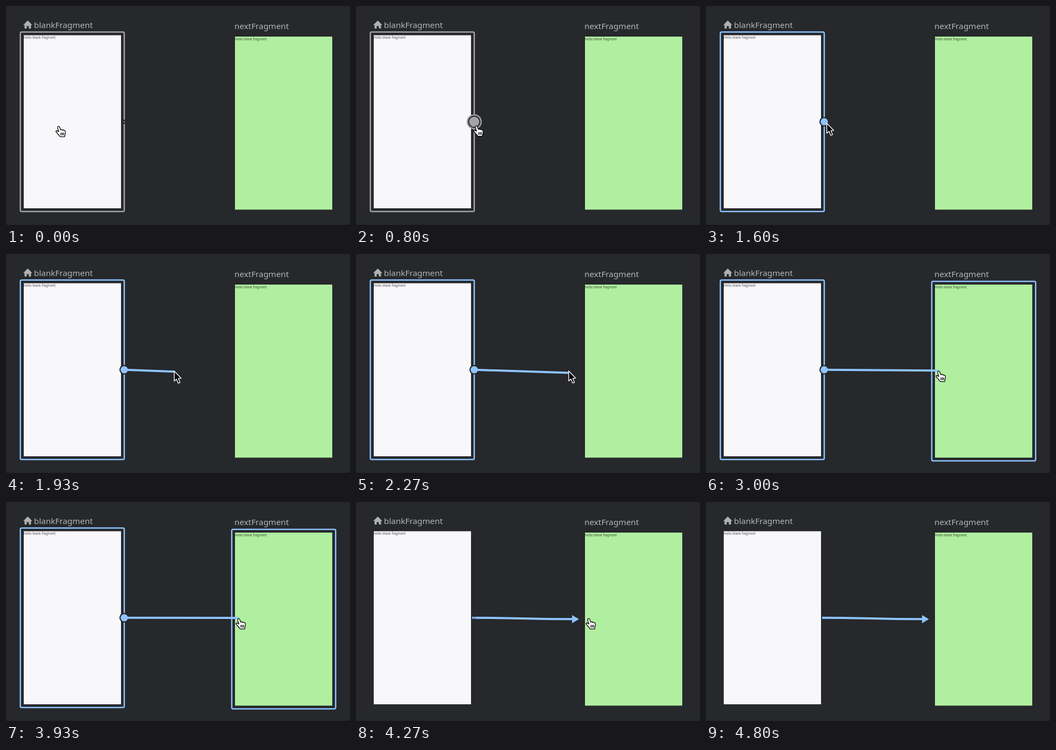
An HTML page for the animation above (5270 ms loop, 640 by 410 pixels).

```html
<!DOCTYPE html>
<html lang="en">
<head>
<meta charset="utf-8">
<title>Connecting fragments</title>
<style>
  html, body { margin: 0; width: 100%; height: 100%; overflow: hidden; background: #26282b; }
  svg { display: block; width: 100vw; height: 100vh; }
  .title { font: 15.3px "Noto Sans", sans-serif; fill: #b5b5b5; }
  .hello { font: 6.4px Roboto, sans-serif; fill: #000; fill-opacity: .62; }
  .frame { fill: none; stroke-width: 2.5; }
  .line { fill: none; stroke: #8fc3ff; stroke-width: 4; }
</style>
</head>
<body>
<svg viewBox="0 0 640 410">
  <rect width="640" height="410" fill="#26282b"/>
  <rect y="408" width="640" height="2" fill="#161517"/>

  <path fill="#b0b0b0" d="M32 35.5 40.5 27 49 35.5H46.5V42H42.5V37.5H38.5V42H34.5V35.5Z"/>
  <text class="title" x="52" y="40.7">blankFragment</text>
  <rect x="33" y="54.5" width="181" height="322.5" fill="#f8f7fa"/>
  <text class="hello" x="33" y="61.3">Hello blank fragment</text>
  <rect id="from" class="frame" x="26.7" y="48.5" width="193.3" height="334.5" rx="2.5"/>

  <text class="title" x="425" y="43.3">nextFragment</text>
  <rect x="426" y="57" width="181" height="322.5" fill="#b0eea0"/>
  <text class="hello" x="426" y="63.8">Hello blank fragment</text>
  <rect id="to" class="frame" x="420" y="51" width="193.3" height="334.5" rx="2.5" stroke="#8fc3ff"/>

  <g id="action">
    <path class="line" d="M216 215.7C309 215.7 309 218.3 403 218.3"/>
    <path fill="#8fc3ff" d="M402 210.7 414.7 218.3 402 226Z"/>
  </g>

  <circle id="rim" cx="220" cy="215.7" fill="#26282b" stroke="#a3a3a5"/>
  <path id="drag" class="line"/>
  <circle id="dot" cx="220" cy="215.7"/>

  <g id="hand" stroke="#000" stroke-width="1.3" stroke-linejoin="round">
    <path fill="#fff" d="M4.2 2.2C5 .5 7 .8 7.6 2.4L9.8 8C10.5 7 12 7 12.6 8.2 13.5 7.4 15 7.8 15.4 9 16.6 8.4 18 9 18.3 10.6 18.8 13.5 18.6 15 17.6 17.2L17 20.6H8.6C7.6 18.4 5 16.5 3.6 14.4 2.6 13 .8 12 .8 10.6 1 9.2 3 9.2 4.6 10.2L6.2 11.4 4.2 5Z"/>
    <path fill="none" d="M10.2 13v5M12.7 13v5M15.2 13v5"/>
  </g>
  <path id="arrow" fill="#000" stroke="#fff" stroke-width="1.4" stroke-linejoin="round"
    d="M0 0V18.6L4.2 15 7.4 22.6 10.8 21.2 7.6 13.8 13 13.4Z"/>
</svg>
<script>
const $ = id => document.getElementById(id);
const TICK = 1000 / 15, LOOP = 5270;
const GREY = '#a3a3a5', BLUE = '#8fc3ff';

// Keys are [tick, value] pairs, joined linearly.
const tipX = [[0, 97], [4, 152], [6, 152], [12, 223], [23, 223], [24, 224.7], [26, 250],
  [31, 355], [34, 395.7], [39, 417.5], [45, 432]];
const tipY = [[0, 224], [12, 223], [23, 223], [24, 218.5], [34, 218], [45, 218], [50, 218], [51, 217]];
const lineY = [[24, 217], [34, 221.5], [45, 217.3], [56, 217.3], [59, 216]];
const rimR = [[0, 4], [4, 9], [7, 9], [12, 12.8], [17, 12.8], [19, 9], [61, 9], [65, 0]];
const rimW = [[7, 0], [12, 2.5], [17, 2.5], [19, 0]];
const dotR = [[0, 1.2], [4, 6.5], [7, 6.5], [12, 9.5], [17, 9.5], [19, 6.8], [61, 6.8], [65, 0]];

function at(keys, k) {
  const i = keys.findIndex(key => key[0] > k);
  if (i < 0) return keys[keys.length - 1][1];
  if (!i) return keys[0][1];
  const [a, u] = keys[i - 1], [b, v] = keys[i];
  return u + (v - u) * (k - a) / (b - a);
}

const set = (id, name, value) => $(id).setAttribute(name, value);
const show = (id, on) => set(id, 'visibility', on ? 'visible' : 'hidden');
const move = (id, x, y) => set(id, 'transform', `translate(${x} ${y})`);

function draw(ms) {
  const k = Math.floor((ms % LOOP + 5) / TICK);
  const x = at(tipX, k), y = at(tipY, k);
  const colour = k < 18 ? GREY : BLUE;
  const pointing = k >= 24 && k < 41;

  set('from', 'stroke', colour);
  show('from', k < 62);
  show('to', k >= 41 && k < 62);
  show('action', k >= 62);

  set('rim', 'r', at(rimR, k));
  set('rim', 'stroke-width', at(rimW, k));
  set('dot', 'r', at(dotR, k));
  set('dot', 'fill', colour);

  show('drag', k > 24 && k < 62);
  set('drag', 'd', `M220 215.7L${x + 1} ${at(lineY, k)}`);

  show('arrow', pointing);
  move('arrow', x, y);
  show('hand', !pointing && k < 65);
  move('hand', x - 5, y - 1);
}

const start = performance.now();
function loop() {
  draw(performance.now() - start);
  requestAnimationFrame(loop);
}
loop();
</script>
</body>
</html>
```
